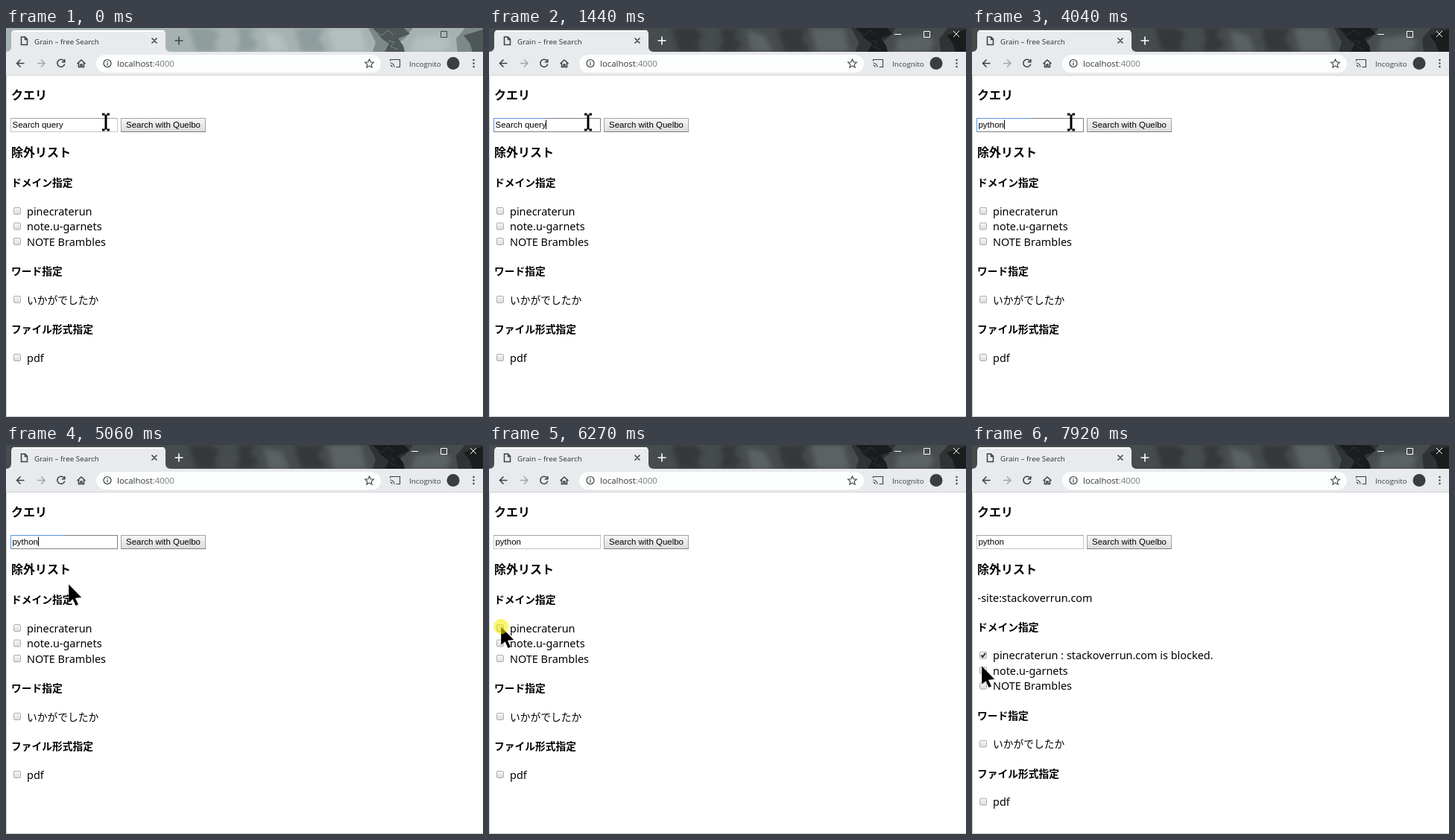
Animation of 640x523 px, one loop 8000 ms. Source, as an HTML page:

```html
<!DOCTYPE html>
<html lang="ja">
<head>
<meta charset="utf-8">
<title>Search form</title>
<style>
html, body { margin: 0; width: 100%; height: 100%; overflow: hidden; background: #fff; }
svg { display: block; width: 100%; height: 100%; }
text { white-space: pre; }
.ui { font-family: "Open Sans", "Noto Sans", sans-serif; }
.form { font: 11.46px "Liberation Sans", Arial, sans-serif; }
.body { font: 14.45px "Noto Sans", sans-serif; }
.jp { font: 13.75px "Noto Sans CJK JP", "Noto Sans CJK", sans-serif; }
.h3, .h4 { font: bold 13.75px "Noto Sans CJK JP", "Noto Sans CJK", sans-serif; }
.h3 { font-size: 16px; }
.line { fill: none; stroke: #3c4043; stroke-width: 1.5; }
#strip { --sky: #a6b2b2; --mist: #b3bebe; --cloud: #8f9c9d; --rock: #4e5656; --rim: #7d8888; --ink: #3f4446; }
#strip.active { --sky: #464b4d; --mist: #5c6264; --cloud: #36393b; --rock: #1a1d1d; --rim: #2f3334; --ink: #fff; }
#strip .active-only { display: none; }
#strip.active .active-only { display: inline; }
</style>
</head>
<body>
<svg viewBox="0 0 640 523" preserveAspectRatio="none">
  <defs>
    <linearGradient id="face" x2="0" y2="1">
      <stop stop-color="#f7f7f7"/><stop offset="1" stop-color="#dcdcdc"/>
    </linearGradient>
    <filter id="soft" x="-10%" y="-50%" width="120%" height="200%">
      <feGaussianBlur stdDeviation="3"/>
    </filter>
    <g id="box">
      <rect x="10.5" y="241.5" width="9" height="9" rx="1.5" fill="url(#face)" stroke="#adadad"/>
    </g>
  </defs>
  <rect width="640" height="523" fill="#fff"/>

  <g id="strip">
    <rect width="640" height="33" fill="var(--sky)"/>
    <g filter="url(#soft)">
      <path fill="var(--cloud)" d="M245 0h30l12 9-8 12 6 11h-30zM310 0h26l-9 11 12 9-8 12h-22l5-15zM388 0h40l-9 13 12 19h-34l-6-16z"/>
      <path fill="var(--mist)" d="M346 4l25 6 9 22h-28zM432 0h44l8 32h-44zM548 14l34-5 16 8-8 15h-46z"/>
    </g>
    <path fill="var(--rim)" d="M486 0h60l-10 13-8 6 4 13h-40l4-13zM604 14l12-14h24v32h-34z"/>
    <path fill="var(--rock)" d="M492 0h42l8 8-16 6 7 10 2 8h-27l6-11-10-7zM614 10l26-8v30h-14l-4-12z"/>
    <path fill="none" stroke="var(--rim)" d="M495 4l9 6 8-7 8 6M513 17l8 2-5 6 10 4"/>
    <path fill="#e8eaed" d="M0 32q7 0 7-7V8q0-5 5-5h197q5 0 5 5v17q0 7 7 7z"/>
    <path stroke="#fff" stroke-width="2" d="M9 4h203"/>
    <g fill="none" stroke="var(--ink)">
      <path stroke-width="1.6" d="M226.500 17h11M232 11.500v11"/>
      <path d="M583.500 4.500h8v8h-8z"/>
      <path class="active-only" d="M544 8.500h9M623 4l8 8m0-8l-8 8"/>
    </g>
    <path class="line" stroke-width="1" d="M20.500 12h5l3 3v7.500h-8zM25.500 12v3.500h3M195.500 13.500l7 7m0-7l-7 7"/>
    <text class="ui" x="38" y="21.500" font-size="9.85" fill="#2c3033">Grain – free Search</text>
  </g>

  <g id="toolbar">
    <rect y="32" width="640" height="32" fill="#e8eaed"/>
    <path stroke="#d2d5d8" d="M0 63.500h640"/>
    <rect x="121" y="36" width="382" height="24" rx="12" fill="#fcfdfd"/>
    <path class="line" d="M24.500 47.500h-10m5-5l-5 5 5 5"/>
    <path class="line" style="stroke:#a4a7aa" d="M42 47.500h10m-5-5l5 5-5 5"/>
    <path class="line" d="M78 44.500a5 5 0 1 0 .7 4M78.800 42v3.800h-4"/>
    <path class="line" d="M95.500 48l5.500-5 5.500 5M97.500 47v5.500h2.500v-3.500h2v3.500h2.500v-5.500"/>
    <circle class="line" style="stroke-width:1.2" cx="136" cy="47.500" r="5"/>
    <path class="line" style="stroke-width:1.2" d="M136 46.500v4M136 44.300v1.200"/>
    <path class="line" style="stroke-width:1.1" d="M487.500 42l1.700 3.800 4.100.4-3.100 2.700.9 4.100-3.600-2.200-3.600 2.200.9-4.100-3.100-2.700 4.100-.4z"/>
    <path class="line" style="stroke-width:1.1" d="M515.500 44.500v-2h13v10h-5M515.500 47a5.500 5.500 0 0 1 5.500 5.500M515.500 50a2.500 2.500 0 0 1 2.500 2.500"/>
    <circle cx="600" cy="47.500" r="8.500" fill="#3a3d41"/>
    <path stroke="#3c4043" stroke-width="2.400" stroke-linecap="round" d="M627.500 43v0M627.500 47.500v0M627.500 52v0"/>
    <text class="ui" x="149" y="52" font-size="11.4" fill="#33363a">localhost<tspan fill="#777b80">:4000</tspan></text>
    <text class="ui" x="541" y="51.500" font-size="9.85" fill="#3c4043">Incognito</text>
  </g>
  <path fill="none" stroke="#c8c8c8" d="M.5 64v458.500h639.500"/>

  <text class="h3" x="7" y="96.300">クエリ</text>
  <rect x="6.500" y="121.500" width="143" height="18" fill="#fff" stroke="#c6c6c6"/>
  <path stroke="#a2a2a2" d="M6 121.500h144"/>
  <g id="focus" fill="none">
    <rect x="6.500" y="121.500" width="143" height="18" stroke="#7c8086"/>
    <path stroke="#5b93e0" d="M6.500 140v-18.500h70"/>
  </g>
  <rect id="mark" x="8" y="123" width="69" height="14" fill="#3390ff"/>
  <text id="query" class="form" x="8.500" y="134"></text>
  <rect id="caret" y="123.500" width="1" height="12.500"/>
  <rect x="154.500" y="121.500" width="113" height="18" fill="url(#face)" stroke="#a3a3a3"/>
  <path stroke="#7d7d7d" d="M154 139.500h114"/>
  <text class="form" x="161" y="134">Search with Quelbo</text>

  <text class="h3" x="7" y="173.300">除外リスト</text>
  <text id="filter" class="body" x="7.500" y="210.500">-site:stackoverrun.com</text>
  <g id="lists">
    <text class="h4" x="7" y="213">ドメイン指定</text>
    <use href="#box"/>
    <path id="tick" fill="none" stroke="#333" stroke-width="2" d="M12.300 246l2 2.300 3.700-5"/>
    <text class="body" x="28" y="251.700">pinecraterun<tspan id="blocked"> : stackoverrun.com is blocked.</tspan></text>
    <use href="#box" y="20.500"/>
    <text class="body" x="28" y="272.200">note.u-garnets</text>
    <use href="#box" y="41"/>
    <text class="body" x="28" y="292.700">NOTE Brambles</text>
    <text class="h4" x="7" y="332">ワード指定</text>
    <use href="#box" y="119"/>
    <text class="jp" x="28" y="370.800">いかがでしたか</text>
    <text class="h4" x="7" y="410">ファイル形式指定</text>
    <use href="#box" y="197"/>
    <text class="body" x="28" y="448.500">pdf</text>
  </g>

  <g id="pointer">
    <path id="beam" fill="none" stroke="#000" stroke-width="3" d="M-5-10h3.500M1.500-10h3.500M0-9.500v20M-5 11h3.500M1.500 11h3.500"/>
    <path id="arrow" stroke="#fff" stroke-width=".4" d="M0 0v25l5.500-4.500 4 8.700 3.700-1.600-4-8.600 8.300-1z"/>
    <circle id="glow" r="10.300" fill="#f7ef00" fill-opacity=".56"/>
  </g>
</svg>
<script>
const LOOP = 8000;
const byId = id => document.getElementById(id);
const show = (id, on) => byId(id).setAttribute('visibility', on ? 'visible' : 'hidden');

// Each step changes only the listed parts of the state.
const steps = [
  [0, { text: 'Search query', at: [134, 126], beam: true }],
  [210, { active: true, glow: true }],
  [400, { focus: true, caret: true, at: [133, 126] }],
  [610, { glow: false }],
  [1020, { caret: false }],
  [1440, { caret: true }],
  [1820, { mark: true, caret: false }],
  [2030, { mark: false, text: '', caret: true }],
  [2630, { caret: false }],
  [3030, { text: 'p', caret: true }],
  [3230, { text: 'py' }],
  [3430, { text: 'pyt' }],
  [3630, { text: 'pyth' }],
  [4040, { text: 'python' }],
  [4640, { caret: false, at: [134, 127] }],
  [4840, { beam: false, at: [117, 152] }],
  [5040, { caret: true, at: [84, 187] }],
  [5240, { at: [45, 224] }],
  [5440, { at: [18, 251] }],
  [5660, { caret: false, at: [12, 258] }],
  [5860, { at: [13.5, 243] }],
  [6080, { focus: false, glow: true, at: [16, 244] }],
  [6280, { glow: false, checked: true }],
  [6480, { at: [16, 254] }],
  [6680, { at: [15, 270] }],
  [6880, { at: [15, 281] }],
  [7100, { at: [15, 287] }],
  [7310, { at: [6, 275] }],
  [7520, { at: [10, 283] }],
  [7720, { at: [13, 292] }],
  [7920, { at: [13, 297] }],
];

let current = -1;

function draw(index) {
  const s = Object.assign({}, ...steps.slice(0, index + 1).map(step => step[1]));
  const query = byId('query');
  byId('strip').classList.toggle('active', !!s.active);
  query.textContent = s.text;
  query.setAttribute('fill', s.mark ? '#fff' : '#000');
  byId('caret').setAttribute('x', Math.round(8.2 + (s.text ? query.getComputedTextLength() : 0)));
  byId('lists').setAttribute('transform', `translate(0 ${s.checked ? 36.6 : 0})`);
  byId('pointer').setAttribute('transform', `translate(${s.at})`);
  for (const id of ['focus', 'mark', 'caret', 'beam', 'glow']) show(id, s[id]);
  for (const id of ['filter', 'tick', 'blocked']) show(id, s.checked);
  show('arrow', !s.beam);
}

function frame() {
  const t = performance.now() % LOOP;
  const index = steps.filter(([start]) => start <= t).length - 1;
  if (index !== current) draw(current = index);
  requestAnimationFrame(frame);
}
frame();
</script>
</body>
</html>
```
